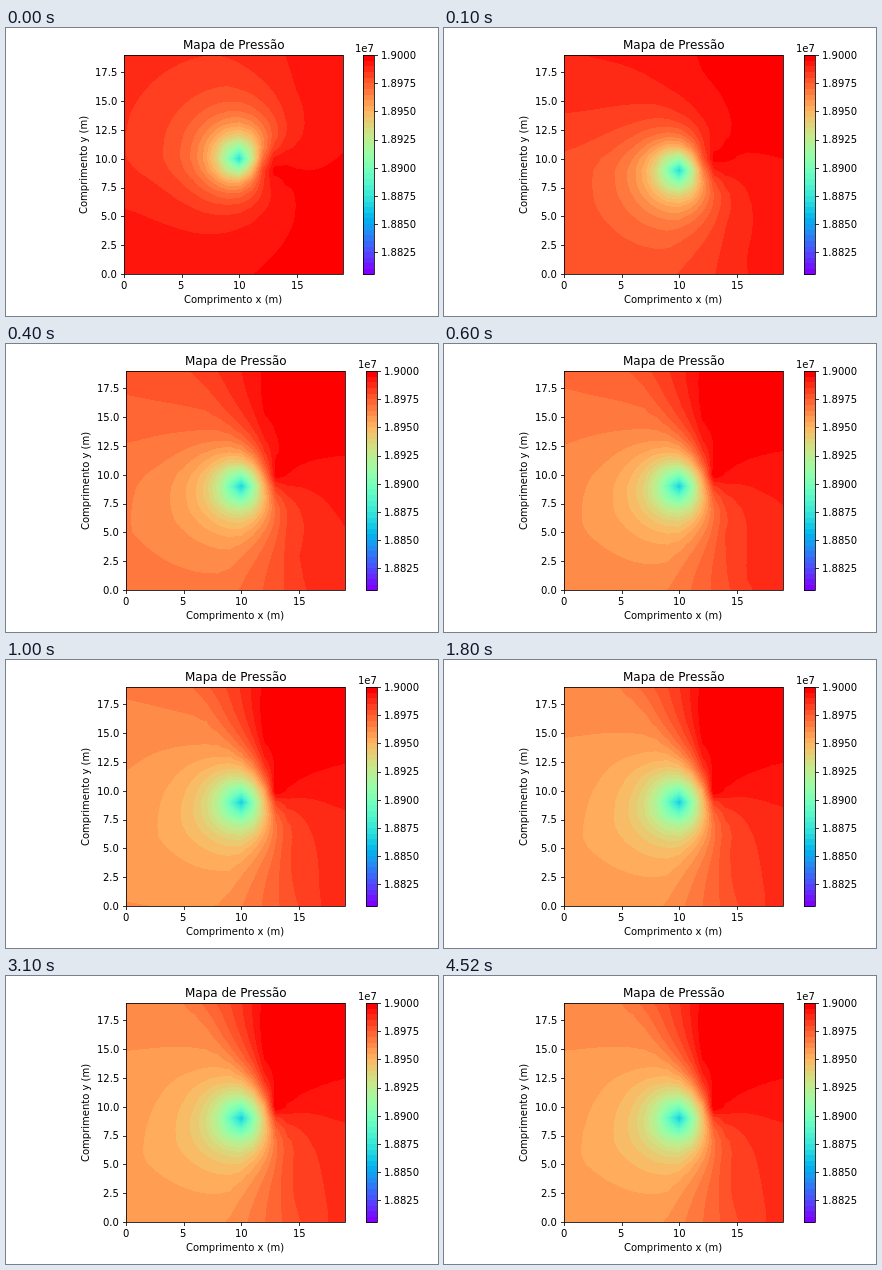
An HTML page with a canvas that plays this animation: 432 px wide and 288 px high, repeating every 5.27 s.

```html
<!DOCTYPE html>
<html lang="pt">
<head>
<meta charset="utf-8">
<title>Mapa de Pressão</title>
<style>
html, body { margin: 0; width: 100%; height: 100%; overflow: hidden; background: #fff; }
canvas { display: block; }
</style>
</head>
<body>
<canvas id="stage" width="432" height="288"></canvas>
<script>
const ctx = document.getElementById('stage').getContext('2d');
const LOOP = 5270, SIZE = 219, TOP = 27, CELLS = 19, BANDS = 39;
const WELL = [10, 9], HINGE = [13, 9.6], START = 38.4;

// Steady pressure (in contour bands) by direction in degrees around the hinge
const FAN = [[23, 38.1], [60, 39.5], [92, 39.3], [97, 38.2], [108, 36.2], [120, 34.25], [131, 32.3],
  [161, 31.4], [200, 30.9], [243, 31.6], [291, 36.3], [347, 37.1], [383, 38.1]];

function fanLevel(deg) {
  const a = ((deg - 23) % 360 + 360) % 360 + 23;
  const k = FAN.findIndex(p => p[0] > a);
  const [a0, l0] = FAN[k - 1], [a1, l1] = FAN[k];
  return l0 + (l1 - l0) * (a - a0) / (a1 - a0);
}

// Rainbow colour map, one colour per contour band
const COLORS = Array.from({ length: BANDS }, (_, i) => {
  const v = i / (BANDS - 1);
  return [Math.abs(2 * v - 0.5), Math.sin(Math.PI * v), Math.cos(Math.PI * v / 2)]
    .map(c => Math.round(255 * Math.min(1, Math.max(0, c))));
});

function level(x, y, seconds) {
  const dx = x - HINGE[0], dy = y - HINGE[1], dist = Math.hypot(dx, dy);
  const u = dx / dist, v = dy / dist;
  const progress = 1 - 0.8 * Math.exp(-2.9 * seconds);
  const delay = 1 + 1.6 * Math.max(0, v) + 0.5 * Math.max(0, u);
  const bend = 18 * v * Math.max(0, 1 - dist / 10);
  const steady = fanLevel(Math.atan2(dy, dx) * 180 / Math.PI - bend);
  const far = START + (steady - START) * progress ** delay;

  // Logarithmic drawdown cone around the well
  const r2 = (x - WELL[0]) ** 2 + (y - WELL[1]) ** 2;
  const reach = 14 * (1 - Math.exp(-dist * dist / 5)) * Math.max(0, 0.6 - 0.4 * u - 0.25 * v);
  const cone = 5.6 * Math.log((r2 + reach + 0.4) / (r2 + 0.4));
  return far - cone * (1 + 0.27 * (1 - progress));
}

const image = ctx.createImageData(SIZE, SIZE);

function drawField(left, seconds, flipped) {
  const nodes = [];
  for (let j = 0; j <= CELLS; j++) {
    nodes.push(Array.from({ length: CELLS + 1 }, (_, i) => level(i, j, seconds)));
  }
  let o = 0;
  for (let py = 0; py < SIZE; py++) {
    const down = (py + 0.5) / SIZE * CELLS;
    const y = flipped ? down : CELLS - down;
    const j = Math.floor(y), fy = y - j;
    for (let px = 0; px < SIZE; px++) {
      const x = (px + 0.5) / SIZE * CELLS, i = Math.floor(x), fx = x - i;
      const low = nodes[j][i] * (1 - fx) + nodes[j][i + 1] * fx;
      const high = nodes[j + 1][i] * (1 - fx) + nodes[j + 1][i + 1] * fx;
      const band = Math.floor(low * (1 - fy) + high * fy);
      const c = COLORS[Math.min(BANDS - 1, Math.max(0, band))];
      image.data[o++] = c[0];
      image.data[o++] = c[1];
      image.data[o++] = c[2];
      image.data[o++] = 255;
    }
  }
  ctx.putImageData(image, left, TOP);
}

// Text on whole pixels; anchor 0 = left, 0.5 = centre, 1 = right
function text(str, x, y, anchor, size = 10) {
  ctx.font = size + 'px "DejaVu Sans", sans-serif';
  ctx.fillText(str, Math.round(x - anchor * ctx.measureText(str).width), Math.round(y));
}

function line(x0, y0, x1, y1) {
  ctx.beginPath();
  ctx.moveTo(x0, y0);
  ctx.lineTo(x1, y1);
  ctx.stroke();
}

const snap = v => Math.round(v) + 0.5;

function drawAxes(left) {
  const bottom = TOP + SIZE, unit = SIZE / CELLS, middle = left + SIZE / 2;
  ctx.strokeRect(left + 0.5, TOP + 0.5, SIZE, SIZE);
  for (let v = 0; v <= 15; v += 5) {
    const x = left + v * unit;
    line(snap(x), bottom + 0.5, snap(x), bottom + 4);
    text(String(v), x, bottom + 15, 0.5);
  }
  for (let v = 0; v <= 17.5; v += 2.5) {
    const y = bottom - v * unit;
    line(left - 3, snap(y), left + 0.5, snap(y));
    text(v.toFixed(1), left - 7, y + 3.8, 1);
  }
  text('Mapa de Pressão', middle, TOP - 6, 0.5, 12);
  text('Comprimento x (m)', middle, bottom + 29, 0.5);
  ctx.save();
  ctx.translate(left - 37, TOP + Math.round(SIZE / 2));
  ctx.rotate(-Math.PI / 2);
  text('Comprimento y (m)', 0, 0, 0.5);
  ctx.restore();
}

function drawBar(left) {
  const top = TOP + 0.2, step = 219.5 / BANDS, right = left + 11;
  COLORS.forEach((c, i) => {
    const y0 = Math.round(top + (BANDS - 1 - i) * step), y1 = Math.round(top + (BANDS - i) * step);
    ctx.fillStyle = `rgb(${c})`;
    ctx.fillRect(left, y0, 11, y1 - y0);
  });
  ctx.fillStyle = '#000';
  ctx.strokeRect(left + 0.5, TOP + 0.5, 11, SIZE);
  for (let k = 0; k < 8; k++) {
    const y = top + k * 5 * step;
    line(right + 0.5, snap(y), right + 4, snap(y));
    text((1.9 - k * 0.0025).toFixed(4), right + 7, y + 3.8, 0);
  }
  text('1e7', right, TOP - 3, 1);
}

function draw(step) {
  const first = step === 0, left = first ? 118 : 120;
  ctx.fillStyle = '#fff';
  ctx.fillRect(0, 0, 432, 288);
  ctx.fillStyle = ctx.strokeStyle = '#000';
  ctx.lineWidth = 0.8;
  drawField(left, step / 10, first);
  drawAxes(left);
  drawBar(first ? 357 : 360);
}

let shown = -1;
function tick() {
  const step = Math.floor(performance.now() % LOOP / 100);
  if (step !== shown) draw(shown = step);
  requestAnimationFrame(tick);
}
tick();
</script>
</body>
</html>
```
